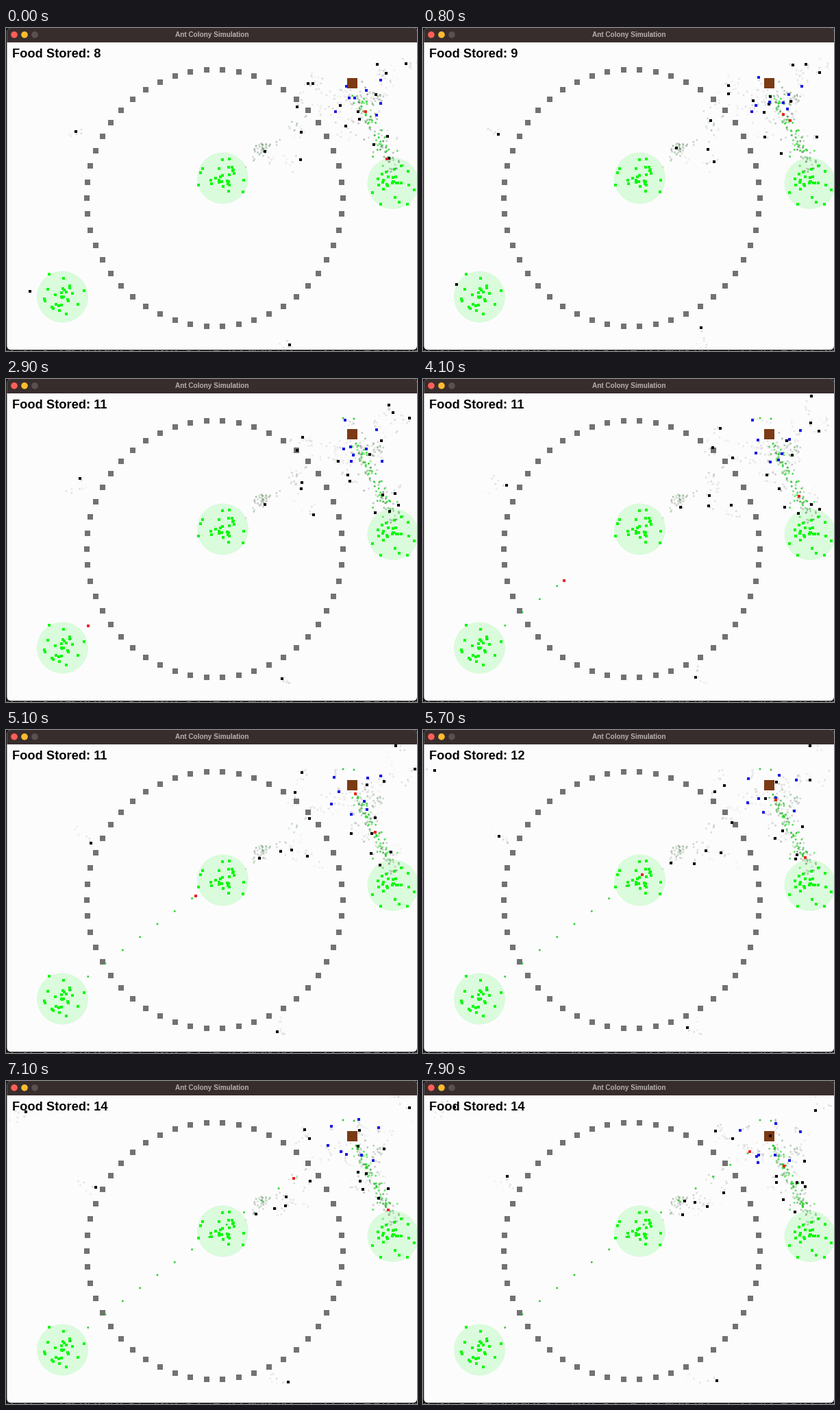
These frames come from a looping animation (600 px wide and 471 px high, 8000 ms). A matplotlib script:

```python
import numpy as np
import matplotlib.pyplot as plt
from matplotlib.animation import FuncAnimation
from matplotlib.patches import Circle, FancyBboxPatch, Rectangle

W, H, DPI = 600, 471, 64
FRAMES, STEP, LEAD = 80, 0.1, 25
NEST = np.array([506, 84])
SPEED = 88
DROP = 0.354
rng = np.random.default_rng(7)


def pt(px):
    return px * 72 / DPI


fig = plt.figure(figsize=(W / DPI, H / DPI), dpi=DPI, facecolor="#161516")
ax = fig.add_axes([0, 0, 1, 1])
ax.set_xlim(0, W)
ax.set_ylim(H, 0)
ax.axis("off")

# ---- window ----
for x in rng.uniform(0, W, 90):
    ax.add_patch(Rectangle((x, 469.6), rng.uniform(1, 4), 1, fc="#6b6a6b", lw=0))
window = FancyBboxPatch((1.4, 0), 598.6, 469.2, fc="#fdfcfd", lw=0,
                        boxstyle="round,pad=0,rounding_size=6")
ax.add_patch(window)


def add(artist):
    ax.add_patch(artist)
    artist.set_clip_path(window)


add(Rectangle((0, 0), W, 20.5, fc="#382d2d", lw=0))
for n, color in enumerate(("#fe5f57", "#febc2e", "#5b5050")):
    add(Circle((12 + 15 * n, 9.8), 4.8, fc=color, lw=0))


def label(x, y, text, px, color, **kw):
    return ax.text(x, y, text, fontsize=pt(px), color=color, zorder=8,
                   family="Liberation Sans", weight="bold", va="baseline", **kw)


label(300.5, 13.2, "Ant Colony Simulation", 10, "#b6aeae", ha="center")
score = label(9, 42.6, "", 18.2, "#050505")


def squares(px, color, z, xy=None):
    xy = np.empty((0, 2)) if xy is None else np.asarray(xy)
    return ax.scatter(xy[:, 0], xy[:, 1], s=pt(px) ** 2, marker="s",
                      c=color, linewidths=0, zorder=z)


# ---- food, walls and nest ----
PATCHES = {
    (316.5, 219): [(316, 192), (326, 191), (287, 205), (284, 211), (281, 229),
                   (330, 203), (333, 212), (347, 222), (346, 239), (299, 222)],
    (565, 226.5): [(577, 201), (567, 206), (587, 209), (549, 213), (588, 229),
                   (596, 236), (535, 240), (547, 257), (574, 254), (586, 257)],
    (82.5, 392): [(84, 365), (93, 376), (61, 381), (57, 398), (67, 407),
                  (78, 412), (88, 417), (105, 403), (114, 383), (81, 386)],
}
for center, outer in PATCHES.items():
    add(Circle(center, 37.5, fc="#dafbdc", lw=0))
    inner = rng.normal(center, 10, (18, 2))
    squares(4.9, "#0cf90c", 3, np.vstack([outer, inner]))

angle = np.arange(50) * 2 * np.pi / 50
squares(7.8, "#737173", 3,
        np.c_[304.5 + 187 * np.cos(angle), 248 + 187 * np.sin(angle)])
ax.add_patch(Rectangle((498, 72.5), 15, 15, fc="#7b3a13", lw=0, zorder=4))

# ---- ants: a few waypoints each, joined by a wandering path ----
WEST = [
    [(441, 81), (434, 72), (427, 73)], [(448, 81), (423, 100), (452, 84)],
    [(488, 113), (452, 115), (439, 163)], [(431, 152), (418, 170), (397, 177)],
    [(425, 115), (417, 185), (382, 175)], [(430, 192), (450, 184), (415, 183)],
    [(378, 180), (376, 187), (379, 195)], [(102, 151), (122, 155), (123, 139)],
    [(414, 462), (398, 435), (429, 437)],
]
EAST = [
    [(584, 52), (578, 76), (646, 38)], [(542, 53), (567, 25), (573, 43)],
    [(555, 66), (566, 64), (557, 117)], [(540, 97), (539, 111), (554, 148)],
    [(516, 133), (502, 140), (516, 148)], [(514, 122), (531, 90), (507, 80)],
    [(496, 143), (520, 160), (516, 139)], [(557, 158), (567, 183), (558, 154)],
]
GUARDS = [
    [(547, 76), (551, 74)], [(497, 85), (463, 72)], [(526, 91), (514, 108)],
    [(501, 102), (489, 119)], [(509, 102), (487, 110)], [(547, 110), (515, 62)],
    [(481, 122), (490, 108)], [(541, 127), (535, 116)],
]
# (time, x, y, picks up food here)
FORAGERS = [
    [(0, 525, 122, True), (2.9, 550, 169, False), (3.8, 560, 196, True),
     (7.9, 543, 191, False)],
    [(0, 556, 191, True), (2.9, 573, 184, False), (4.55, 560, 194, True),
     (7.9, 526, 173, False)],
    [(.1, 567, 190, True), (2.9, 560, 193, False), (5.65, 560, 190, True),
     (7.9, 546, 148, False)],
    [(0, 537, 170, False), (4.1, 528, 187, False), (7.1, 558, 188, True)],
    [(0, 35, 384, False), (1.6, 63, 370, False), (2.4, 84, 387, True)],
]

clock = np.arange(-LEAD, FRAMES) * STEP


def walk(keys, spans=()):
    """Positions over the clock: bowed line when carrying, else wandering."""
    keys = np.array(keys, float)
    start = [[clock[0], *(keys[0, 1:] + rng.normal(0, 12, 2))]]
    keys = np.vstack([start, keys])
    path = np.c_[np.interp(clock, keys[:, 0], keys[:, 1]),
                 np.interp(clock, keys[:, 0], keys[:, 2])]
    for t0, t1 in zip(keys[:-1, 0], keys[1:, 0]):
        part = (clock >= t0) & (clock < t1)
        u = (clock[part, None] - t0) / (t1 - t0)
        if any(a <= (t0 + t1) / 2 < b for a, b in spans):
            path[part, 1:] -= 0.013 * SPEED * (t1 - t0) * np.sin(np.pi * u)
            continue
        for k in range(1, 7):
            sway = rng.normal(0, 6, 2) * min(1.3, (t1 - t0) / 2) / np.sqrt(k)
            path[part] += sway * np.sin(k * np.pi * u)
    path[:, 1] = np.clip(path[:, 1], 23, 466)
    path[:, 0] = path[:, 0] % W
    return path


def trips(stops):
    """Waypoints with the walk home added, and the spans of carrying."""
    keys, spans = [], []
    for t, x, y, food in stops:
        keys.append((t, x, y))
        if food:
            home = t + np.hypot(*(NEST - (x, y))) / SPEED
            keys.append((home, *NEST))
            spans.append((t, home))
    return keys, spans


def timed(row):
    times = (0, 4.1, 7.9) if len(row) == 3 else (0, 7.9)
    return [(t, x, y) for t, (x, y) in zip(times, row)]


scouts = np.array([walk(timed(r)) for r in WEST + EAST])
guards = np.array([walk(timed(r)) for r in GUARDS])
routes = [trips(stops) for stops in FORAGERS]
foragers = np.array([walk(*route) for route in routes])
loads = [span for _, spans in routes for span in spans]
carrying = np.array([[any(a <= t + 1e-6 < b for a, b in spans) for t in clock]
                     for _, spans in routes])
walkers = np.concatenate([scouts, guards])

# ---- scent marks ----
GREEN, MOSS, GREY = np.array([(.08, .85, .1), (.34, .58, .35), (.55, .6, .55)])


def scent(a, b, n, spread, shades, alpha):
    """Dots scattered round the line from a to b, as x, y, r, g, b, alpha."""
    u = rng.uniform(0, 1, (n, 1))
    xy = np.array(a) * (1 - u) + np.array(b) * u + rng.normal(0, spread, (n, 2))
    color = np.array(shades)[rng.integers(0, len(shades), n)]
    return np.c_[xy, color, rng.uniform(alpha / 2, alpha, n)]


DULL = [MOSS, GREY]
old = np.vstack([
    scent((510, 92), (558, 192), 60, 5, [GREEN, GREEN, MOSS], .95),
    scent((515, 95), (560, 190), 36, 9, DULL, .6),
    scent((556, 193), (574, 204), 16, 7, DULL, .7),
    scent((534, 98), (550, 102), 12, 4, DULL, .6),
    scent((366, 183), (382, 170), 30, 5, DULL, .6),
    scent((352, 200), (450, 118), 14, 3, DULL, .45),
    scent((450, 112), (500, 85), 14, 8, [GREY], .3),
])
drops = [(0.9, 492, 57), (1.2, 508, 58)]
for path, (_, spans) in zip(foragers, routes):
    for a, b in spans:
        for t in np.arange(a + 0.146, min(b, 8), DROP):
            drops.append((t, np.interp(t, clock, path[:, 0]),
                          np.interp(t, clock, path[:, 1])))
drops = np.array(drops)


def marks(i):
    t = clock[i]
    aged = old.copy()
    aged[:, 5] *= 1 - 0.03 * t
    fresh = drops[drops[:, 0] <= t]
    dim = np.clip((t - fresh[:, :1]) / 16, 0, 1)
    color = GREEN * (1 - dim) + MOSS * dim
    groups = [aged, np.c_[fresh[:, 1:], color, np.full(len(fresh), .9)]]
    for n, path in enumerate(walkers):
        steps = np.array([s for s in range(i - 24, i) if (s + n) % 3 == 0])
        fade = 0.26 * (1 - (i - steps) / 26)
        groups.append(np.c_[path[steps], np.full((len(steps), 3), .46), fade])
    return np.vstack(groups)


dots = ax.scatter([], [], s=pt(3) ** 2, linewidths=0, zorder=3.5)
black = squares(4.3, "#050505", 5)
blue = squares(4.3, "#1a1ae6", 6)
red = squares(4.5, "#f0241f", 7)


def draw(frame):
    i = frame + LEAD
    data = marks(i)
    dots.set_offsets(data[:, :2])
    dots.set_facecolor(data[:, 2:])
    load = carrying[:, i]
    black.set_offsets(np.vstack([scouts[:, i], foragers[~load, i]]))
    blue.set_offsets(guards[:, i])
    red.set_offsets(foragers[load, i])
    stored = 8 + sum(home <= clock[i] + 1e-6 for _, home in loads)
    score.set_text(f"Food Stored: {stored}")
    return dots, black, blue, red, score


anim = FuncAnimation(fig, draw, frames=FRAMES, interval=100, repeat=True,
                     repeat_delay=0, blit=False)
plt.show()
```
